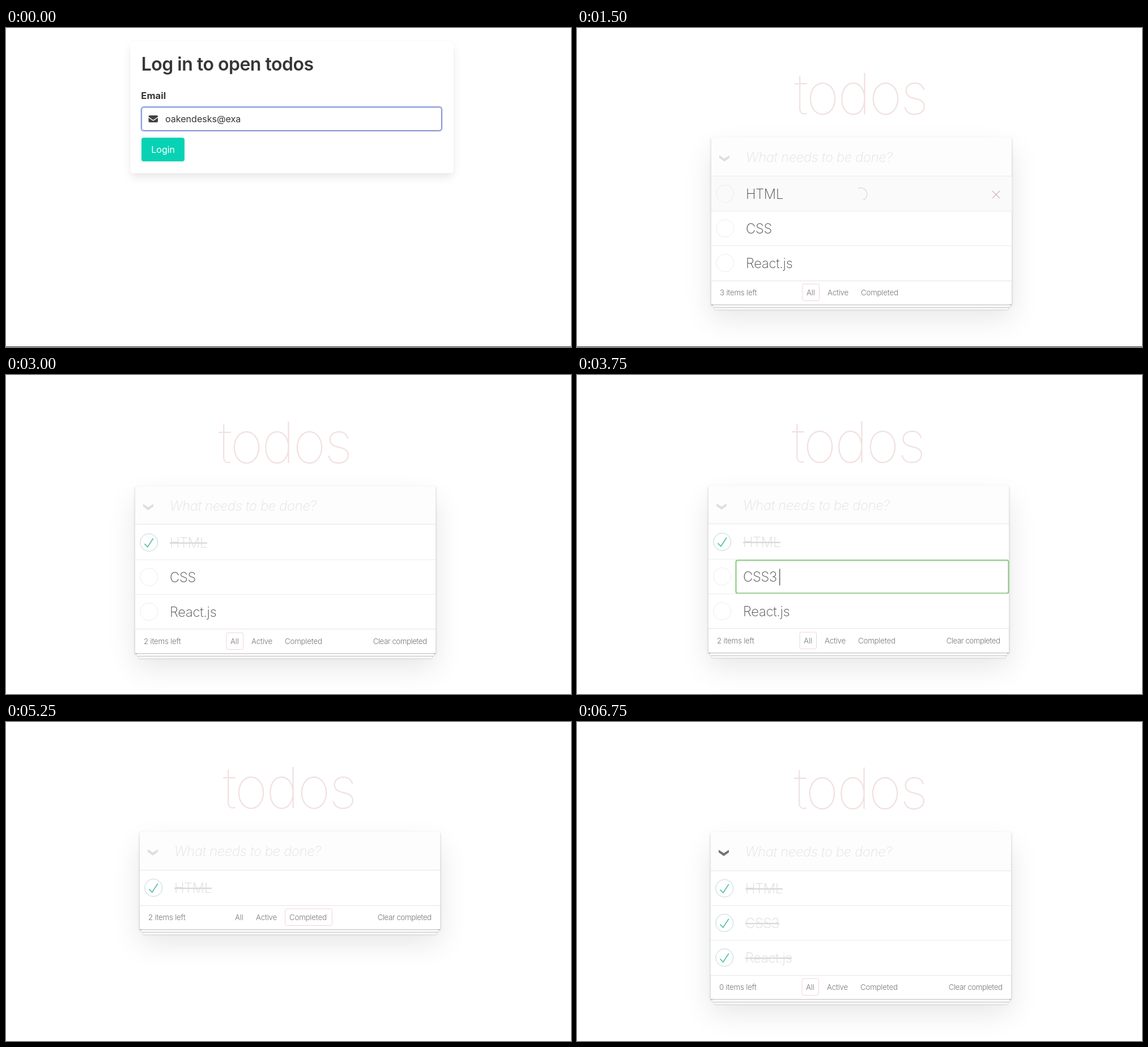
These frames come from a looping animation (997x562 px, 7500 ms). An HTML page:

```html
<!DOCTYPE html>
<html lang="en">
<head>
<meta charset="utf-8">
<title>Todos</title>
<style>
  html, body { margin: 0; width: 100%; height: 100%; overflow: hidden; background: #fff; }
  body { position: relative; font-family: Inter, "Liberation Sans", sans-serif; font-optical-sizing: none; }
  .scene { position: absolute; left: 0; top: 0; visibility: hidden; animation: show 7.5s step-end infinite; }
  @keyframes show { 0% { visibility: visible; } 10%, 100% { visibility: hidden; } }
  .scene div { position: absolute; box-sizing: border-box; }
  svg { position: absolute; left: 0; top: 0; width: 1px; height: 1px; overflow: visible; }
  text { white-space: pre; }

  .rule { position: absolute; left: 0; top: 561px; width: 997px; height: 1px; background: #3a3a3a;
    visibility: hidden; animation: rule 7.5s step-end infinite; }
  @keyframes rule { 0% { visibility: visible; } 40%, 100% { visibility: hidden; } }

  .box { left: 218.5px; top: 22.5px; width: 571px; height: 233px; border-radius: 6px; background: #fff;
    box-shadow: 0 8px 16px -2px rgba(10,10,10,.1), 0 0 0 1px rgba(10,10,10,.02); }
  .ring { fill: none; stroke: rgba(72,95,199,.25); stroke-width: 5; }
  .field { fill: #fff; stroke: #485fc7; }
  .login { fill: #08d2b4; }
  .heading { font-size: 32px; font-weight: 600; letter-spacing: -.0155em; fill: #363636; }
  .label { font-size: 16.6px; font-weight: 700; fill: #363636; }
  .value { font-size: 16.2px; letter-spacing: -.005em; fill: #363636; }
  .white { fill: #fff; }

  .card, .input, .footer { left: 0; width: 530.5px; }
  .card { top: 0; background: #fff; box-shadow: 0 2px 4px rgba(0,0,0,.2), 0 24px 48px rgba(0,0,0,.1); }
  .input { top: 0; height: 68.5px; background: #fdfdfd; box-shadow: inset 0 -2px 1px rgba(0,0,0,.05); }
  .footer { height: 42.5px; background: #fff; border-top: 1px solid #e4e4e4;
    box-shadow: 0 1px 1px rgba(0,0,0,.2), 0 8px 0 -3px #f8f8f8, 0 8.7px 1px -3px rgba(0,0,0,.2),
      0 15.5px 0 -6px #f8f8f8, 0 16.4px 2px -6px rgba(0,0,0,.2); }
  .title { font-size: 101px; font-weight: 100; letter-spacing: -.03em; text-anchor: middle; fill: #f3e0e0; }
  .item { font-size: 23.8px; font-weight: 250; letter-spacing: -.012em; fill: #4d4d4d; }
  .done { fill: #d9d9d9; text-decoration: line-through; }
  .hint { fill: #e2e2e2; font-style: italic; }
  .small { font-size: 13.3px; font-weight: 300; letter-spacing: -.015em; fill: #777; }
  .end { text-anchor: end; letter-spacing: -.035em; }
  .hover { fill: #fafafa; }
  .line { fill: none; stroke: #ededed; }
  .tab { fill: none; stroke: #efd5d5; }
  .focus { fill: #fff; stroke: #86c97c; stroke-width: 2; }
  .caret { stroke: #4d4d4d; stroke-width: 1.3; }
</style>
</head>
<body>
<div class="rule"></div>
<script>
const WIDTH = 530.5, HEAD = 68.5, ROW = 61, FOOT = 42.5;
const TABS = {
  All: { text: 168, left: 161, width: 29.5 },
  Active: { text: 205, left: 198, width: 51.5 },
  Completed: { text: 264, left: 256.5, width: 83 }
};

const text = (cls, x, y, str) => `<text class="${cls}" x="${x}" y="${y}">${str}</text>`;
const rect = (cls, x, y, w, h, r = 3) =>
  `<rect class="${cls}" x="${x}" y="${y}" width="${w}" height="${h}" rx="${r}"/>`;
const caret = (x, y) => `<path class="caret" d="M${x} ${y}v29"/>`;
const div = (cls, style = '') => `<div class="${cls}" style="${style}"></div>`;

function loginScene() {
  const envelope = `<g fill="#424242" transform="translate(251.5 154)">
    <path d="M1.6 0h13.4a1.6 1.6 0 0 1 1 2.8L9.2 7.6a1.6 1.6 0 0 1-1.8 0L.6 2.8A1.6 1.6 0 0 1 1.6 0z"/>
    <path d="M0 4l6.7 4.8a2.8 2.8 0 0 0 3.2 0L16.6 4v6.3a2 2 0 0 1-2 2H2a2 2 0 0 1-2-2z"/></g>`;
  return div('box') + '<svg>' +
    rect('ring', 239.3, 139.6, 529.2, 41, 4) +
    rect('field', 239.3, 139.6, 529.2, 41, 4) +
    rect('login', 239, 193.3, 76, 41.7, 4) + envelope +
    text('heading', 238.7, 75, 'Log in to open todos') +
    text('label', 238.3, 125, 'Email') +
    text('value', 281, 166, 'oakendesks@exa') +
    text('value white', 256.2, 220, 'Login') + '</svg>';
}

function toggle(y, done) {
  const tick = '<path fill="#5dc2af" transform="scale(.31) translate(-50 -50)" d="M72 25L42 71 27 56l-4 4 20 20 34-52z"/>';
  return `<g transform="translate(24.2 ${y})">
    <circle class="line" r="15.5" style="stroke:${done ? '#bddad5' : '#ededed'}"/>${done ? tick : ''}</g>`;
}

function todoRow(item, i) {
  const top = HEAD + ROW * i;
  let out = '';
  if (item.busy) out += rect('hover', 0, top, WIDTH, ROW, 0);
  if (i) out += `<path class="line" d="M0 ${top}H${WIDTH}"/>`;
  out += toggle(top + 30.5, item.done);
  if (item.edit) out += rect('focus', 48.5, top + 2, 481, 58) + caret(125.7, top + 17);
  out += text(item.done ? 'item done' : 'item', 61, top + 39.2, item.name);
  if (item.busy) {
    out += `<path fill="none" stroke="#dcdcdc" stroke-width="1.4" d="M259 ${top + 21}A11 11 0 1 1 268 ${top + 41.5}"/>
      <path stroke="#dcb5b5" stroke-width="1.3" d="M496 ${top + 25.5}l13 13m0-13l-13 13"/>`;
  }
  return out;
}

function footer(top, left, tab, clear) {
  const { left: x, width } = TABS[tab];
  const base = top + 26;
  return text('small', 15, base, `${left} items left`) +
    Object.entries(TABS).map(([name, t]) => text('small', t.text, base, name)).join('') +
    rect('tab', x, top + 6.5, width, 29.5) +
    (clear ? text('small end', 514.5, base, 'Clear completed') : '');
}

function todoScene({ items = [], left, tab = 'All', typed, dark, clear = true }) {
  const footTop = HEAD + ROW * items.length;
  const height = items.length ? footTop + FOOT : HEAD;
  const chevron = `<path fill="${dark ? '#737373' : '#dedede'}" transform="translate(23 36.7)"
    d="M-9-5.5L0 .3 9-5.5V-1L0 5.5-9-1z"/>`;
  let html = div('card', `height:${height}px`) + div('input');
  if (items.length) html += div('footer', `top:${footTop}px`);
  html += '<svg>' + text('title', 263.5, -40.8, 'todos');
  if (typed) html += rect('focus', .7, .5, WIDTH - 1, HEAD);
  html += chevron + text(typed ? 'item' : 'item hint', 61, 43, typed || 'What needs to be done?');
  if (typed) html += caret(125.2, 20);
  html += items.map(todoRow).join('');
  if (items.length) html += footer(footTop, left, tab, clear);
  return html + '</svg>';
}

const todo = (name, extra) => ({ name, ...extra });
const done = { done: true };
const html = todo('HTML', done), css = todo('CSS'), css3 = todo('CSS3'), react = todo('React.js');

const scenes = [
  { x: 0, y: 0, html: loginScene() },
  { x: 232.5, y: 193, html: todoScene({ typed: 'HTML', dark: true }) },
  { x: 236.5, y: 193.3, html: todoScene({ items: [todo('HTML', { busy: true }), css, react], left: 3, clear: false }) },
  { x: 235.5, y: 193.5, html: todoScene({ items: [html, css, react], left: 2 }) },
  { x: 227.5, y: 195.7, html: todoScene({ items: [html, css, react], left: 2 }) },
  { x: 231.7, y: 194.5, html: todoScene({ items: [html, todo('CSS3', { edit: true }), react], left: 2 }) },
  { x: 236, y: 193.5, html: todoScene({ items: [css3, react], left: 2, tab: 'Active' }) },
  { x: 235.5, y: 193.3, html: todoScene({ items: [html], left: 2, tab: 'Completed' }) },
  { x: 232, y: 194, html: todoScene({ items: [html, css3, react], left: 2 }) },
  { x: 235.5, y: 194.3, html: todoScene({ items: [html, todo('CSS3', done), todo('React.js', done)], left: 0, dark: true }) }
];

document.body.insertAdjacentHTML('beforeend', scenes.map((s, i) =>
  `<div class="scene" style="left:${s.x}px;top:${s.y}px;animation-delay:${i ? i * .75 - 7.5 : 0}s">${s.html}</div>`).join(''));
</script>
</body>
</html>
```
